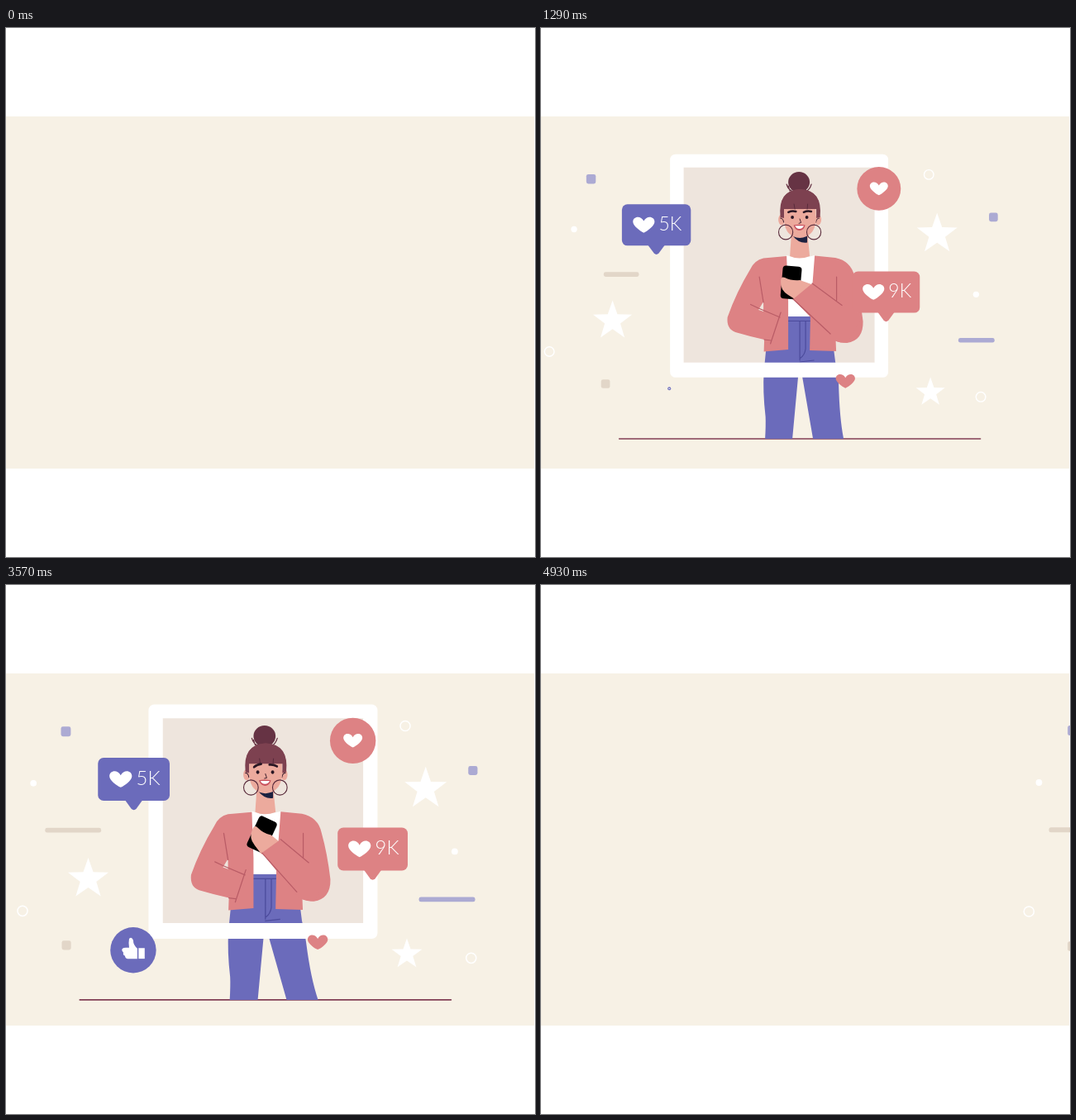
An HTML page with a canvas for the animation above (5 s loop, 640 by 640 pixels).

```html
<!DOCTYPE html>
<html>
<head>
<meta charset="utf-8">
<style>
html, body { margin: 0; height: 100%; overflow: hidden; background: #fff; }
canvas { display: block; }
</style>
</head>
<body>
<canvas id="stage" width="640" height="640"></canvas>
<script>
const ctx = document.getElementById('stage').getContext('2d');
const LOOP = 5000, STEP = LOOP / 70;
const PURPLE = '#6b6bbb', CORAL = '#dd8284', LILAC = '#acaad3', SAND = '#e2d6c8',
      SKIN = '#ecaa9d', HAIR = '#7d4150', BUN = '#663344', SEAM = '#b95c66', DENIM = '#4c4b9c';
const HEART = 'M0 10C-5 8-14 1-14-4C-14-11-4-13 0-5C4-13 14-11 14-4C14 1 5 8 0 10Z';

const clamp = v => Math.min(1, Math.max(0, v));
const smooth = (t, from, to) => { const u = clamp((t - from) / (to - from)); return u * u * (3 - 2 * u); };

// cubic-bezier(x1, 0, x2, 1)
function bezier(x, x1, x2) {
  let lo = 0, hi = 1, s;
  for (let i = 0; i < 24; i++) {
    s = (lo + hi) / 2;
    const v = 3 * (1 - s) * s * ((1 - s) * x1 + s * x2) + s ** 3;
    v < x ? lo = s : hi = s;
  }
  return s * s * (3 - 2 * s);
}

function fill(color, d, rule) {
  ctx.fillStyle = color;
  ctx.fill(new Path2D(d), rule || 'nonzero');
}
function line(color, width, d) {
  ctx.strokeStyle = color;
  ctx.lineWidth = width;
  ctx.stroke(new Path2D(d));
}
function ellipse(color, x, y, rx, ry = rx, strokeWidth = 0) {
  ctx.beginPath();
  ctx.ellipse(x, y, rx, ry, 0, 0, 7);
  ctx.fillStyle = ctx.strokeStyle = color;
  ctx.lineWidth = strokeWidth;
  strokeWidth ? ctx.stroke() : ctx.fill();
}
function box(color, x, y, w, h, r) {
  ctx.beginPath();
  ctx.roundRect(x, y, w, h, r);
  ctx.fillStyle = color;
  ctx.fill();
}
function group(draw, x, y, scale = 1, degrees = 0) {
  ctx.save();
  ctx.translate(x, y);
  ctx.scale(scale, scale);
  ctx.rotate(degrees * Math.PI / 180);
  draw();
  ctx.restore();
}

const heart = (color, x, y, scale) => group(() => fill(color, HEART), x, y, scale);
const ring = () => ellipse('#fff', 0, 0, 6.1, 6.1, 1.5);
const dot = () => ellipse('#fff', 0, 0, 3.9);
const square = (color, size) => box(color, -size / 2, -size / 2, size, size, 2.5);

function star(r) {
  ctx.beginPath();
  for (let i = 0; i < 10; i++) {
    const a = i * Math.PI / 5, q = i % 2 ? r * .4 : r;
    ctx.lineTo(Math.sin(a) * q, -Math.cos(a) * q);
  }
  ctx.fillStyle = '#fff';
  ctx.fill();
}

function bubble(color, label, w) {
  box(color, -w / 2, -26.3, w, 52.6, 7);
  fill(color, 'M-11 25L11 25L3 36Q0 39-3 36Z');
  heart('#fff', -16, 0, .98);
  ctx.fillStyle = '#fff';
  ctx.font = '300 24px Lato, sans-serif';
  ctx.fillText(label, 3, 7);
}

function thumb() {
  ellipse(PURPLE, 0, 0, 28);
  box('#fff', 6.5, -2.5, 7.5, 13, 0);
  fill('#fff', 'M5-2V10.5H-7Q-10 10-10 7Q-13 6-12 3Q-15 0-13-2Q-12-3-9-3H-5Q-6-9-5-14Q-2-17 0-12Q0-6 5-2Z');
}

function head(t, lift) {
  line(BUN, 1.2, 'M306 198Q300 196 298 189M302 197L300 191M321 198Q326 196 328 189');
  ellipse(BUN, 313, 186.5, 13, 12.5);
  fill(SKIN, 'M304 246L302 276Q313 281 326 276L323 246Z');
  fill('#1c2140', 'M305 248Q313 254 323 251V259.5Q313 261 306 252Z');
  ellipse(SKIN, 292, 232, 4, 6.5);
  ellipse(SKIN, 336, 232, 4, 6.5);
  line('#3a2030', 1, 'M290.5 230Q294 230 294.5 235M337.5 230Q334 230 333.5 235');
  fill(HAIR, 'M290.5 229Q287 196 314.5 195Q342 196 338.5 229L334 230V215H295V230Z');
  fill(SKIN, 'M295 214V234Q297 253 314 254Q331 253 333.5 234V214Z');
  fill(HAIR, 'M291 219Q291 197 314 195Q338 197 338 219Z');
  line('#5a2c3c', 1, 'M308 219L307 213M323 219L323.5 213');
  ellipse('#5a2c3c', 297, 247, 8.6, 8.9, 1.1);
  ellipse('#5a2c3c', 331, 247, 8.6, 8.9, 1.1);

  const brow = side => group(() => line('#2a1724', 2.6, 'M-4.5 .8Q0-1.2 4.5 0'),
    314 + side * 9.3, 222 - lift * 1.2, 1, side * lift * 18);
  brow(-1);
  brow(1);
  const shut = [2071, 2929].some(b => Math.abs(t - b) < 90);
  for (const x of [305, 322.5]) {
    if (shut) line('#4a2833', 1.2, `M${x - 2.5} ${230 - lift}q2.5 -2 5 0`);
    else ellipse('#2a1724', x, 229, 1.9, 2.1);
  }
  line('#4a2833', 1, 'M314 231L315.5 235.5L313 236.3');
  fill('#c8505c', 'M306.5 238.5Q313 237 320.5 238.5Q319 245 313.5 245Q308 244.5 306.5 238.5Z');
  fill('#fff', 'M308.2 239.3H319Q317.5 243 313.5 243Q309.5 243 308.2 239.3Z');
}

// drawn around the wrist
function phoneHand() {
  ctx.translate(-319, -318);
  group(() => box('#000', -11.5, -20, 23, 40, 4), 303.5, 308, 1, 5);
  fill(SKIN, 'M291 306Q291 300 296 302Q304 306 314 305L331 311L311 330L300 323Q290 317 291 306Z');
}

function person(t, pose) {
  const foot = 9 * pose;
  fill(PURPLE, `M277 349H350L357 404Q361 422 ${361 + pose} 430Q${362 + foot * .6} 472 ${367 + foot} 497
    H${330 + foot}L316 416H312.5L305 497H272Q273 480 272.5 470Q269 440 270.5 416Z`);
  line(DENIM, 1.2, 'M299 354.5H329M314 354.5V402M321 354.5V388Q320 396 314 400M314 404L331 402');
  fill('#fff', 'M298 275Q313 281 332 275L331 349H299Z');
  head(t, pose);
  // far sleeve and open jacket fronts
  fill(CORAL, `M298 276L270 278.5Q259 281 254 292Q237 320 226.5 350Q225 364 236 368Q253 373 271 377
    L270.5 391.5L300 389V330Z M270 331L264 341L270 343Z`, 'evenodd');
  line(SEAM, 1.2, 'M265 301L270 332M254.5 334.5L264 339L290 350M291 344L278.5 382M271 377L279 378');
  fill(CORAL, 'M332 275.5L357 278Q376 282 380 300Q387 325 390.5 355Q391 378 371 381Q362 381 357.5 378.5L358 391L326 390L327 340Z');
  // near arm
  const cuffTop = `${329 + 3 * pose} ${309 - pose}`, cuffEnd = `${306 + 4 * pose} ${328 - 4 * pose}`;
  group(phoneHand, 319 + 2 * pose, 318 - pose, 1, 20 * pose);
  fill(CORAL, `M${cuffTop}L${cuffEnd}L352 376Q362 382 372 380L389 350L362 322Z`);
  line(SEAM, 1.2, `M${cuffTop}L365 335.5M358.5 301V330M${cuffEnd}L351 370`);
}

function draw(t) {
  const enter = -600 * clamp(1 - t / 1600) ** 4;
  const leave = 574 * bezier(clamp((t - 4000) / 1000), .574, .273);
  const shift = enter + leave;
  const far = 1 - clamp((t - 710) / 3290) ** 1.3;    // remaining camera zoom
  const lag = Math.exp((710 - t) / 770);             // remaining parallax
  const pose = smooth(t, 2200, 2800);

  // depth: [zoom, parallax, drift]
  const BACK = [.062, 12, 0], FRONT = [.052, 45.5, 0], FRAME = [.064, 12, 23];
  const put = ([zoom, pan, drift], x, y, paint, scale = 1) => {
    const k = 1 - zoom * far;
    group(paint, 320 + (x - 320) * k - pan * lag - drift * far + shift, 320 + (y - 320) * k, k * scale);
  };

  ctx.fillStyle = '#fff';
  ctx.fillRect(0, 0, 640, 640);
  ctx.fillStyle = '#f7f1e5';
  ctx.fillRect(0, 107, 639, 426);
  ctx.lineCap = ctx.lineJoin = 'round';

  const dashWidth = Math.max(0, 71 * (1 - .64 * Math.exp((710 - t) / 950)));
  const dash = color => box(color, -dashWidth / 2, -3, dashWidth, 6, 2.5);
  put([.085, -4, 0], 77.7, 296.3, () => dash(SAND));
  put([.06, -8, 0], 535.5, 381, () => dash(LILAC));
  put(BACK, 485, 169, ring);
  put(FRONT, 566, 452.5, ring);
  put(FRONT, 18.5, 395, ring);
  put(BACK, 545.5, 322.5, dot);
  put(BACK, 30.5, 239, dot);
  put(FRONT, 71.4, 176, () => square(LILAC, 12));
  put(BACK, 567.7, 223.5, () => square(LILAC, 11.3));
  put(BACK, 70.8, 437, () => square(SAND, 11.3));
  put(FRONT, 510.5, 246, () => star(27));
  put(FRONT, 98.7, 356, () => star(26));
  put(BACK, 487, 448, () => star(19.5));

  put(FRAME, 315, 285.8, () => box('#eee5dd', -124, -128, 248, 254, 0));
  group(() => {
    ctx.translate(-320, -320);
    line('#823f56', 1.6, 'M95.5 497H532.5');
    person(t, pose);
  }, 320 + shift, 320, (1 - .037 * far) / .967);
  put(FRAME, 315, 285.8, () => {
    ctx.beginPath();
    ctx.roundRect(-140, -143.3, 280, 286.6, 7);
    ctx.rect(-122.5, -126.3, 245, 250.5);
    ctx.fillStyle = '#fff';
    ctx.fill('evenodd');
  });

  put(FRONT, 154.3, 234.3, () => bubble(PURPLE, '5K', 87.5));
  put(FRONT, 445.8, 319.5, () => bubble(CORAL, '9K', 85.5));
  put([.06, 12, 0], 378, 433.5, () => heart(CORAL, 0, 0, .88));
  put(BACK, 421, 187, () => {
    ellipse(CORAL, 0, 0, 28);
    heart('#fff', 0, 0, .83);
  }, smooth(t, 745, 1165));
  put(BACK, 152.5, 443, thumb, smooth(t, 1215, 1635));
}

function tick(now) {
  draw(Math.floor((now % LOOP + 5) / STEP) % 70 * STEP);
  requestAnimationFrame(tick);
}
requestAnimationFrame(tick);
</script>
</body>
</html>
```
